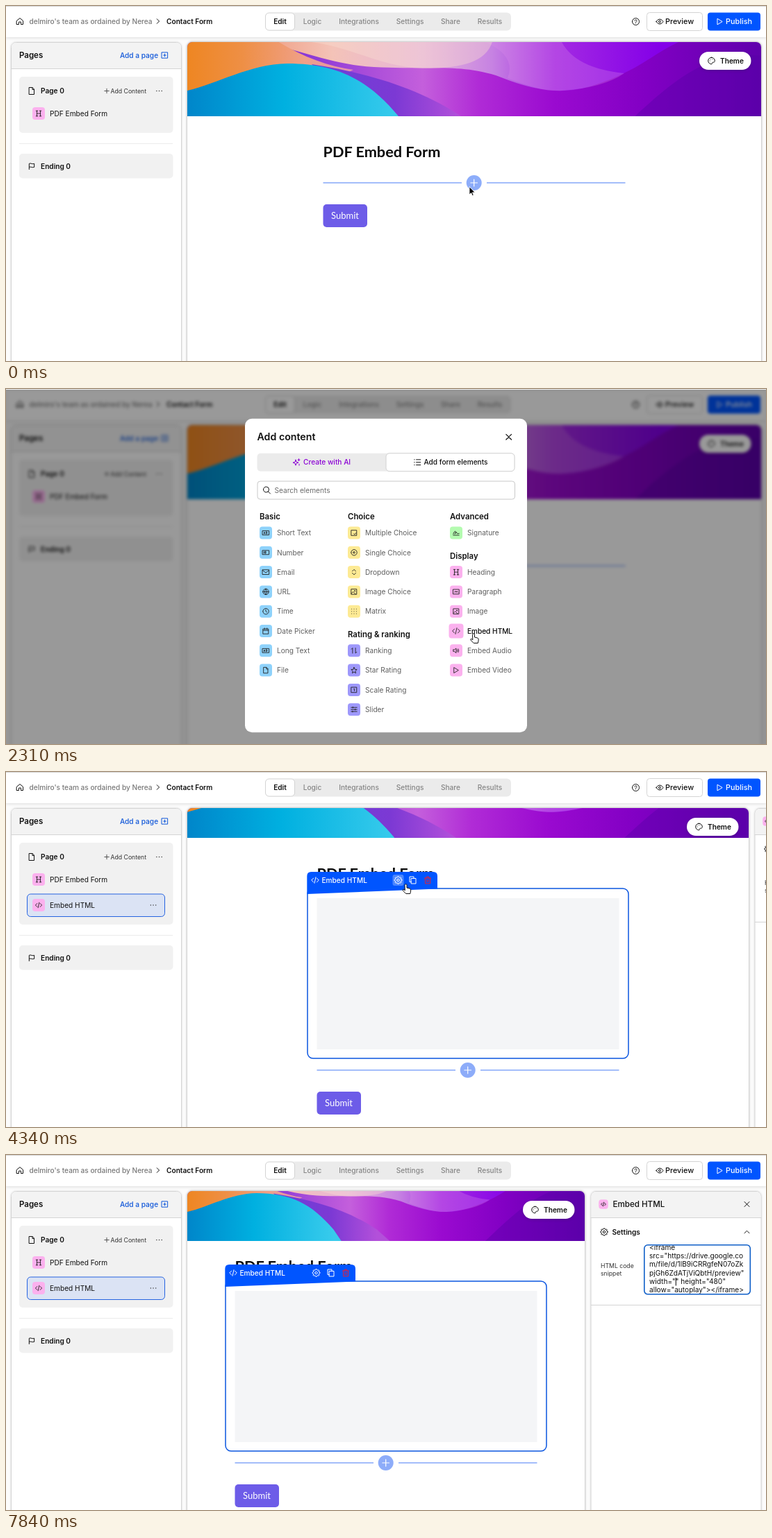
Write an HTML page that moves like this. It is 1094 px wide and 512 px high and loops after 8 s.

```html
<!DOCTYPE html>
<html lang="en">
<head>
<meta charset="utf-8">
<title>Form builder</title>
<style>
html, body { margin: 0; width: 100%; height: 100%; overflow: hidden; background: #fff }
svg { display: block }
text { font-family: Inter, sans-serif; white-space: pre }
text.brand { font-family: Lato, sans-serif }
path { stroke-linecap: round; stroke-linejoin: round }
</style>
</head>
<body>
<script>
const gearPath = 'M' + Array.from({ length: 32 }, (_, i) => {
  const r = i % 4 < 2 ? 11 : 8.5, a = (i - .5) * Math.PI / 16;
  return (12 + r * Math.cos(a)).toFixed(1) + ' ' + (12 + r * Math.sin(a)).toFixed(1);
}).join('L') + 'zM8.5 12a3.5 3.5 0 1 0 7 0 3.5 3.5 0 1 0-7 0';

const ring = 'M2 12a10 10 0 1 0 20 0 10 10 0 1 0-20 0';
const box = 'M3 3h18v18H3z';
const icons = {
  home: 'M3 10.5 12 3l9 7.5V21h-6v-7H9v7H3z',
  right: 'm9 4 8 8-8 8', up: 'm4 16 8-8 8 8', close: 'm4 4 16 16M20 4 4 20',
  help: ring + 'M9 9.5a3 3 0 1 1 4.500 2.600q-1.500 .8-1.500 2M12 17v.1',
  info: ring + 'M12 11v6M12 7v.1',
  eye: 'M2 12s4-7 10-7 10 7 10 7-4 7-10 7S2 12 2 12zM9 12a3 3 0 1 0 6 0 3 3 0 1 0-6 0',
  play: 'M5 3 20 12 5 21z',
  file: 'M5 2h9l5 5v15H5zM14 2v6h5',
  flag: 'M4 22V4c5-3 9 3 16 0v11c-7 3-11-3-16 0',
  plus: 'M12 3v18M3 12h18', plusBox: box + 'M12 8v8M8 12h8',
  dots: 'M4 12h.1M12 12h.1M20 12h.1',
  heading: 'M6 3v18M18 3v18M6 12h12M3 3h6M15 3h6M3 21h6M15 21h6',
  code: 'm7 6-6 6 6 6M17 6l6 6-6 6M14 3l-4 18',
  gear: gearPath,
  copy: 'M8 7h13v15H8zM15 7V2H3v15h5',
  trash: 'M3 6h18M5 6v16h14V6M9 6V2h6v4M10 11v6M14 11v6',
  palette: 'M12 2a10 10 0 1 0 0 20c3 0 1-4 3-5 2-1 7 1 7-5 0-6-5-10-10-10zM7 12h.1M9 7.5h.1M15 7.5h.1',
  wand: 'M10 5l2 6 6 2-6 2-2 6-2-6-6-2 6-2zM19 2v6M16 5h6M20 17v4',
  list: 'M9 4h13M9 12h13M9 20h13M3 4h1M3 12h1M3 20h1',
  mic: 'M8 6a4 4 0 0 1 8 0v6a4 4 0 0 1-8 0zM4 11a8 8 0 0 0 16 0M12 19v4M8 23h8',
  upload: 'M12 16V2M6 8l6-6 6 6M2 14v8h20v-8',
  search: 'M2 10a8 8 0 1 0 16 0 8 8 0 1 0-16 0M16 16l6 6',
  text: 'M1 5h22v14H1zM5 15l2-6 2 6M13 9v6h3q3-1 0-3q3-2 0-3z',
  number: 'M1 5h22v14H1zM5 9v6M9 9v6h3V9z',
  mail: 'M1 4h22v16H1zM1 6l11 8 11-8',
  globe: ring + 'M2 12h20M12 2q-8 10 0 20M12 2q8 10 0 20',
  clock: ring + 'M12 6v6l4 3',
  date: 'M3 5h18v17H3zM3 10h18M8 2v5M16 2v5',
  check: box + 'm8 12 3 3 5-6',
  radio: ring + 'M9 12a3 3 0 1 0 6 0 3 3 0 1 0-6 0',
  updown: 'm6 9 6-6 6 6M6 15l6 6 6-6',
  image: box + 'M3 18l6-6 8 8M14 8h2v2h-2z',
  grid: [4, 12, 20].map(y => `M4 ${y}h.1M12 ${y}h.1M20 ${y}h.1`).join(''),
  rank: 'M7 21V3L3 7M17 3v18l4-4',
  star: 'm12 2 3 7 7 .6-5.500 5L18 22l-6-4-6 4 1.500-7.400L2 9.600 9 9z',
  scale: box + 'M11 9l2-1v8',
  slider: 'M2 5h20M2 12h20M2 19h20M8 3v4M16 10v4M7 17v4',
  sign: 'M2 20h20M2 16q6-14 8-8t-3 8q6-9 7-5t2 4 6-1',
  para: 'M2 4h20v16H2zM6 14l3-4 3 4 3-4 3 4',
  sound: 'M2 9v6h4l6 5V4L6 9zM16 9q2 3 0 6M19 6q4 6 0 12'
};

const txt = (x, y, s, size = 10.13, weight = 500, fill = '#111', anchor = 'start', extra = '') =>
  `<text x="${x}" y="${y}" font-size="${size}" font-weight="${weight}" fill="${fill}" text-anchor="${anchor}" ${extra}>${s}</text>`;
const rect = (x, y, w, h, fill, r = 0, stroke = 'none', extra = '') =>
  `<rect x="${x}" y="${y}" width="${w}" height="${h}" rx="${r}" fill="${fill}" stroke="${stroke}" ${extra}/>`;
const icon = (name, x, y, size, color = '#111', line = 1) =>
  `<path d="${icons[name]}" transform="translate(${x - size / 2} ${y - size / 2})scale(${size / 24})" fill="none" stroke="${color}" stroke-width="${line * 24 / size}"/>`;
const tile = (name, x, y, color, size = 18) =>
  rect(x - size / 2, y - size / 2, size, size, color, 4) + icon(name, x, y, size * .56, '#222', .9);
const hline = (x, y, w, color) => rect(x, y, w, 1, color);
const grad = (id, stops) => `<linearGradient id="${id}" gradientUnits="userSpaceOnUse" x1="261" x2="1087">` +
  stops.map(([x, c]) => `<stop offset="${(x - 261) / 826}" stop-color="${c}"/>`).join('') + '</linearGradient>';

const grey = '#777', edge = '#d4d4d4', blue = '#0055ff', pink = '#fbb1ee';

const header = `<g style="filter:drop-shadow(0 1px 2px #0002)">${rect(0, 0, 1094, 45, '#fff')}</g>` +
  hline(0, 0, 1094, '#d6d6d6') + icon('home', 20, 22, 12) +
  txt(33.5, 26, "delmiro's team as ordained by Nerea", 10.13, 500, grey) +
  icon('right', 218.5, 22, 10) + txt(231, 26, 'Contact Form', 10.13, 600) +
  rect(373, 9.5, 354, 26, '#ebebeb', 6) + rect(373.5, 10, 42, 25, '#fff', 5, edge) +
  [['Edit', 394.5], ['Logic', 441], ['Integrations', 508], ['Settings', 581.5], ['Share', 640], ['Results', 696.5]]
    .map(([s, x], i) => txt(x, 26, s, 10.13, i ? 500 : 600, i ? '#858585' : '#111', 'middle')).join('') +
  icon('help', 906.5, 22.5, 12) + rect(922.5, 9.5, 80, 26, '#fff', 4, edge) + icon('eye', 941, 22.5, 12) +
  txt(949, 26, 'Preview', 10.85, 500) + rect(1010, 9.500, 76, 26, blue, 4) +
  icon('play', 1027.500, 22.500, 11, '#fff') + txt(1036, 26, 'Publish', 10.85, 500, '#fff');

const panel = x => `<g style="filter:drop-shadow(0 0 1.500px #0002)">${rect(x + .5, 52.5, 245, 480, '#fff', 7, edge)}</g>` +
  `<path d="M${x + 1} 90V59.500q0-6.500 6.500-6.500h231q6.500 0 6.500 6.500V90z" fill="#f3f3f3"/>` + hline(x, 90, 246, edge);

const sidebar = panel(7) + txt(19, 75, 'Pages', 11.5, 600) + txt(164, 75, 'Add a page', 10.13, 500, '#0f56d9') +
  icon('plusBox', 228.5, 71, 11, '#0f56d9') + rect(19, 102, 221.5, 81, '#f1f1f1', 5, 'none', 'id="pageCard"') +
  icon('file', 37, 122.5, 12) + txt(50, 126, 'Page 0', 10.13, 600) +
  icon('plus', 145, 122.5, 8.5, '#444', .9) + txt(150.500, 126, 'Add Content', 8.68, 400, '#333') + icon('dots', 220.5, 122.5, 11, '#333', 1.4) +
  tile('heading', 47, 155, pink) + txt(63, 159, 'PDF Embed Form', 10.13, 400) +
  `<g id="pageItem">${rect(30.5, 176, 198, 32.5, '#dbe3f4', 5, '#2563e0')}${tile('code', 47, 192, pink)}
  ${txt(63, 195.5, 'Embed HTML', 10.13, 400)}${icon('dots', 212, 192, 11, '#333', 1.4)}</g>` +
  `<g id="ending">${hline(19, 198, 221, '#ebebeb')}${rect(19, 213, 221.5, 35.500, '#f1f1f1', 5)}
  ${icon('flag', 37, 231, 11)}${txt(50, 234.5, 'Ending 0', 10.13, 600)}</g>`;

const wave = 'C420 62 470 85 530 88C620 92 650 84 705 100C760 122 800 130 850 113C910 93 930 70 968 52';
const art = `<rect x="261" y="0" width="826" height="220" fill="url(#deep)"/>
  <path d="M840 220C930 140 990 60 1087 72V220z" fill="#5600a6" opacity=".4"/>
  <path d="M261 22H365V52${wave}V22H261z" fill="url(#sky)"/>
  <path d="M690 52Q735 72 722 104Q770 124 800 122Q860 118 890 97Q820 90 800 52z" fill="#d98be8" opacity=".28"/>
  <path d="M440 52C500 60 540 88 600 90C660 90 690 80 700 52z" fill="#f8dcd0" opacity=".4"/>
  <path d="M261 22H350C400 62 450 85 500 92L420 130H261z" fill="url(#sun)"/>
  <path d="M440 84C530 98 600 122 655 159L690 190H540z" fill="url(#dusk)"/>
  <path d="M261 122C305 112 350 84 405 83C475 83 520 105 565 159L586 190H261z" fill="url(#sea)"/>`;

const canvas = `<clipPath id="frame"><rect id="frameBox" x="261" y="52" width="826" height="480" rx="7"/></clipPath>
  <g style="filter:drop-shadow(0 0 1.500px #0003)"><rect id="sheet" x="260.500" y="51.500" width="827" height="480" rx="7.500" fill="#fff" stroke="${edge}"/></g>
  <g clip-path="url(#frame)">
  <svg id="hero" x="261" y="52" width="826" height="107" viewBox="261 22 826 167" preserveAspectRatio="xMidYMid slice">${art}</svg>
  <g id="content">${txt(456.5, 218, 'PDF Embed Form', 21.7, 700, '#0a0a0a', 'start', 'class="brand"')}
  <g id="block">${rect(443, 232, 462, 245, '#fff', 8, '#0a55e0', 'stroke-width="1.500"')}
  <path d="M442.300 240V214q0-6 6-6h175.700q6 0 6 6v18.500z" fill="${blue}"/>
  ${rect(456.5, 246, 435, 218, '#f4f5f7')}${rect(565.5, 212, 16, 16, '#4a85ff', 3, 'none', 'id="gearHover"')}
  ${icon('code', 454, 220, 11.5, '#fff')}${txt(463.500, 223.5, 'Embed HTML', 10.13, 500, '#fff')}
  ${icon('gear', 573.5, 220, 12, '#fff')}${icon('copy', 594.5, 220, 12, '#fff')}${icon('trash', 616, 220, 12, '#e0203c')}</g>
  <g id="tail"><g id="adder">${rect(456.5, 254.2, 199.500, 1.6, '#1d5cf5')}${rect(692, 254.2, 199.500, 1.6, '#1d5cf5')}
  <circle cx="673.700" cy="255" r="11" fill="#1d5cf5"/>${icon('plus', 673.7, 255, 13, '#fff', 1.2)}</g>
  ${rect(456.5, 286, 63.500, 33, '#6d5ce8', 5)}${txt(488, 307, 'Submit', 13.02, 400, '#fff', 'middle', 'class="brand"')}</g></g>
  <g id="theme"><g style="filter:drop-shadow(0 1px 2px #0003)">${rect(998, 66, 74.500, 26, '#fff', 13)}</g>
  ${icon('palette', 1015.500, 79, 11.5)}${txt(1028, 82.500, 'Theme', 10.13, 600)}</g>
  <rect id="scrollbar" x="1080" y="110.500" width="5" height="420" rx="2.500" fill="#7d7d7d"/></g>`;

const lines = ['&lt;iframe', 'src="https://drive.google.co', 'm/file/d/1lB9iCRRgfeN07oZk', 'pjGh6ZdATjViQbtH/preview"',
  '', 'allow="autoplay">&lt;/iframe>'];
const settings = `<g id="settings">${panel(841.5)}${tile('code', 860, 71, pink, 13.500)}${txt(873.5, 75, 'Embed HTML', 11.58, 500)}
  ${icon('close', 1066.500, 71, 10.5)}${icon('gear', 861, 111, 11.500)}${txt(872.500, 115, 'Settings', 10.13, 600)}${icon('up', 1066.500, 111, 10.5)}
  ${txt(856, 163, 'HTML code', 8.68, 400, '#333')}${txt(856, 173.500, 'snippet', 8.68, 400, '#333')}
  ${rect(918.8, 129.800, 152.500, 71, '#fff', 5, edge, 'id="field"')}
  <clipPath id="fieldClip"><rect x="920" y="130.800" width="150" height="69"/></clipPath>
  <g id="snippet" clip-path="url(#fieldClip)">${lines.map((s, i) => txt(926, 136.7 + 12.3 * i, s, 10.13, 400, '#111', 'start', i == 4 ? 'id="sizeLine"' : '')).join('')}
  <rect id="fieldBar" x="1065" y="139" width="4.500" height="61" rx="2" fill="#8a8a8a"/></g>
  <rect id="caret" width="1" height="11.500"/>${hline(842, 216, 245, edge)}</g>`;

const modalHead = (y, active) => rect(344, y, 406, active ? 452.500 : 428, '#fff', 10) +
  txt(361.5, y + 31.500, 'Add content', 14.2, 600) + icon('close', 723.700, y + 26.500, 11.5, '#111', 1.2) +
  rect(361.5, y + 50, 371, 26, '#ebebeb', 5) + rect(active ? 547 : 362, y + 50, 185, 26, '#fff', 5, '#d0d0d0') +
  icon('wand', 418, y + 63, 12, '#8a00d4') + txt(428, y + 66.500, 'Create with AI', 10.13, 500, '#8a00d4') +
  icon('list', 592, y + 63, 11.5, active ? '#111' : grey) + txt(601.500, y + 66.500, 'Add form elements', 10.13, 500, active ? '#111' : grey);

const aiTab = modalHead(55, 0) + rect(362, 146, 370.5, 115.5, '#fff', 4, edge) +
  txt(369.5, 163, 'Describe the form elements you need, or upload a file and let AI generate', 10.13, 400, '#6b6b6b') +
  txt(369.5, 175.3, 'them for you.', 10.13, 400, '#6b6b6b') +
  '<circle cx="711.300" cy="243" r="10.500" fill="#111"/>' + icon('mic', 711.3, 243, 12, '#fff') +
  txt(361.5, 290, 'Upload a document', 11.5, 600) + icon('info', 481.3, 286, 13) +
  txt(732.500, 289, 'Max 3 files', 8.68, 400, '#555', 'end') +
  rect(362, 301, 370, 123.5, '#f2f2f2', 7, '#acacac', 'stroke-dasharray="3 2" stroke-width="1.300"') +
  icon('upload', 547, 339, 15, '#111', 1.2) +
  txt(547, 367.5, 'Drag and drop to upload or click to browse', 10.13, 500, '#111', 'middle') +
  txt(547, 385.5, 'We respect your privacy, files are never stored.', 8.68, 400, '#555', 'middle') +
  txt(547, 396, 'Supported files: .pdf, png .jpg', 8.68, 400, '#555', 'middle') +
  rect(361.5, 439.5, 371, 26, '#6f98fd', 4) + txt(547, 456.3, 'Generate Content', 10.13, 600, '#fff', 'middle');

// Column groups: x, first row, title, colour, then "Label:icon" entries.
const groups = [
  [365, 0, 'Basic', '#8ed2fb', 'Short Text:text,Number:number,Email:mail,URL:globe,Time:clock,Date Picker:date,Long Text:text,File:file'],
  [492, 0, 'Choice', '#fdea94', 'Multiple Choice:check,Single Choice:radio,Dropdown:updown,Image Choice:image,Matrix:grid'],
  [492, 6, 'Rating &amp; ranking', '#9e98fb', 'Ranking:rank,Star Rating:star,Scale Rating:scale,Slider:slider'],
  [639, 0, 'Advanced', '#b4fbb0', 'Signature:sign'],
  [639, 2, 'Display', pink, 'Heading:heading,Paragraph:para,Image:image,Embed HTML:code,Embed Audio:sound,Embed Video:play']
];
const elementTab = modalHead(42.7, 1) + rect(362, 133, 370.5, 26, '#fff', 4, '#c9c9c9') + icon('search', 375.500, 146, 12) +
  txt(386.500, 149.700, 'Search elements', 10.13, 400, '#6b6b6b') +
  groups.map(([x, row, title, color, items]) => txt(x, 188.300 + 28.3 * row, title, 11.4, 600) +
    items.split(',').map((item, i) => {
      const [label, name] = item.split(':'), y = 207.5 + 28.3 * (row + i);
      return tile(name, x + 9, y, color) + txt(x + 25, y + 3.700, label, 10.13, 400, '#5f5f5f');
    }).join('')).join('') +
  `<g id="pick">${tile('code', 648, 349, pink, 21)}${txt(664, 352.7, 'Embed HTML', 10.13, 400)}</g>`;

const cursors = `<g id="cursor">
  <path id="arrow" d="M0 0v11l2.600-2.400 1.700 3.900 1.800-.8-1.700-3.800h3.600z" fill="#000" stroke="#fff" stroke-width=".8"/>
  <path id="hand" d="M-1.500 1.200a1.500 1.500 0 0 1 3 0V5l4.200 1q1.800 .6 1.500 3l-.9 4.500h-6L-4 9.300q-.8-1.800 .6-2.100l1.900 1.400z" fill="#fff" stroke="#111"/>
  <path id="beam" d="M-2.500-5.500Q0-5.500 0-4.200Q0-5.500 2.500-5.500M0-5V5M-2.500 5.500Q0 5.500 0 4.200Q0 5.500 2.500 5.500" fill="none" stroke="#111"/></g>`;

document.body.innerHTML = `<svg width="100%" height="100%" viewBox="0 0 1094 512"><defs>
  ${grad('deep', [[430, '#8a38d6'], [600, '#c45fdc'], [680, '#b02bd6'], [790, '#9a0ad0'], [920, '#8200c4'], [1087, '#5f00ac']])}
  ${grad('sky', [[365, '#ef9d80'], [470, '#f4c3b8'], [600, '#e6b4da'], [700, '#c682e2'], [790, '#a42be2'], [940, '#8400e8']])}
  ${grad('sun', [[261, '#ee8622'], [340, '#ee8f45'], [430, '#f0a088'], [500, '#e08fb4']])}
  ${grad('dusk', [[450, '#6d3fd8'], [560, '#7c39d4'], [655, '#b350da']])}
  ${grad('sea', [[261, '#0086ca'], [400, '#00b0e0'], [565, '#38cbec']])}</defs>
  ${rect(0, 0, 1094, 512, '#fcfcfc')}<g id="app">${header}${sidebar}${canvas}${settings}</g>
  <g id="modal">${rect(0, 1, 1094, 511, '#000', 0, 'none', 'opacity=".4"')}<g id="ai">${aiTab}</g><g id="elements">${elementTab}</g></g>
  ${cursors}</svg>`;

const $ = id => document.getElementById(id);
const set = (id, attrs) => { for (const k in attrs) $(id).setAttribute(k, attrs[k]); };
const show = (id, on) => { $(id).style.display = on ? '' : 'none'; };
const move = (id, x, y) => set(id, { transform: `translate(${x} ${y})` });
const ease = (t, from, to) => { const p = Math.min(1, Math.max(0, (t - from) / (to - from))); return p * p * (3 - 2 * p); };

// Pointer keys: time, x, y, shape from then on.
const pointer = [
  [0, 667, 261, 'arrow'], [70, 667, 261, 'arrow'], [210, 673, 255, 'hand'], [280, 674, 254, 'hand'],
  [490, 674, 259, 'beam'], [770, 674, 259, 'beam'], [1050, 636, 131, 'arrow'], [1120, 634, 122, 'hand'],
  [1820, 634, 122, 'hand'], [2310, 673, 353, 'hand'], [3150, 673, 353, 'hand'], [3220, 654, 317, 'hand'],
  [3500, 508, 215, 'hand'], [3920, 575.5, 162, 'hand'], [4620, 575.5, 162, 'arrow'], [5040, 995, 154, 'beam'],
  [5740, 995, 154, ''], [6020, 994, 156, 'beam'], [6580, 984, 182, 'beam'], [6930, 984, 182, 'beam'],
  [7000, 1020, 171, 'beam'], [7210, 1020, 171, ''], [8000, 1020, 171, '']
];

function drawPointer(t) {
  const i = pointer.findLastIndex(k => k[0] <= t), [t0, x0, y0, shape] = pointer[i], [t1, x1, y1] = pointer[i + 1];
  const p = ease(t, t0, t1);
  move('cursor', x0 + (x1 - x0) * p, y0 + (y1 - y0) * p);
  for (const s of ['arrow', 'hand', 'beam']) show(s, s == shape);
}

function draw(t) {
  const modal = t >= 490 && t < 2730, added = t >= 2730;
  show('modal', modal);
  $('app').style.filter = modal ? 'blur(2px)' : '';
  show('ai', t < 1400);
  show('elements', t >= 1400);
  show('pick', t >= 2240);

  show('pageItem', added);
  set('pageCard', { height: added ? 118 : 81 });
  move('ending', 0, added ? 37 : 0);

  const slide = t < 4340 ? 0 : Math.round(254 * ease(t, 4283, 4633));
  const narrow = slide > 126;
  const scroll = narrow ? 35 : 64 * ease(t, 2660, 2940);
  set('frameBox', { width: 826 - slide });
  set('sheet', { width: 827 - slide });
  set('hero', { width: 826 - slide, y: 52 - scroll });
  move('content', -slide / 2, -scroll - (narrow ? 15 : 0));
  move('theme', -slide, 0);
  move('settings', 254 - slide, 0);
  show('block', added);
  move('tail', 0, added ? 239 : 0);
  set('adder', { opacity: t < 560 ? .5 + .4 * ease(t, 70, 280) : .5 });
  show('gearHover', t >= 3850 && t < 4480);
  set('scrollbar', { opacity: added ? 1 - ease(t, 3640, 3920) : 0 });

  const focus = t >= 5250, pasted = t >= 5740;
  set('field', { stroke: focus ? '#0f5fc8' : edge, 'stroke-width': focus ? 1.6 : 1 });
  show('snippet', pasted);
  set('fieldBar', { opacity: .8 * (1 - ease(t, 5950, 6300)) });
  const digits = t < 7210 ? 3 : t < 7420 ? 2 : t < 7700 ? 1 : 0;
  $('sizeLine').textContent = `width="${'640'.slice(0, digits)}" height="480"`;
  const [x, y] = !pasted ? [926, 137.5] : t < 6580 ? [1061.5, 189] : [963.8 + 6.4 * digits, 177];
  set('caret', { x, y });
  show('caret', focus && !(t >= 6790 && t < 7000) && !(t >= 7700 && t < 7840));

  drawPointer(t);
}

const start = performance.now();
function loop() {
  const t = (performance.now() - start) % 8000;
  draw(Math.floor(t / 70) * 70);
  requestAnimationFrame(loop);
}
loop();
</script>
</body>
</html>
```
